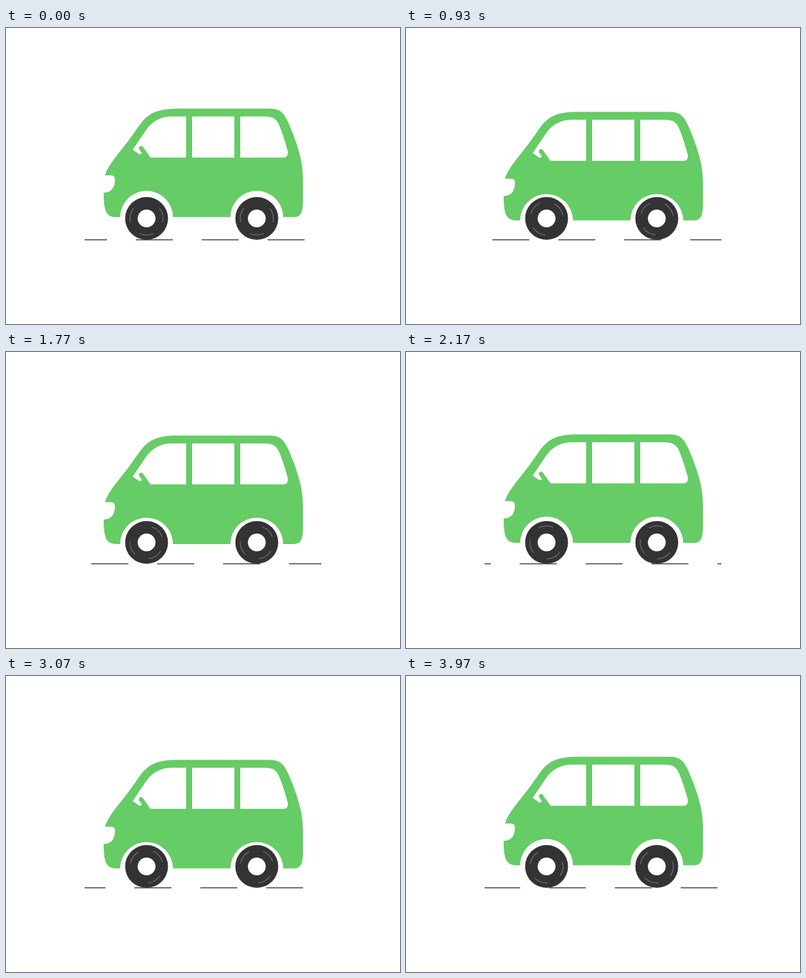
An HTML page that plays this animation: 597x450 px, repeating every 4.01 s.

```html
<!DOCTYPE html>
<html lang="en">
<head>
<meta charset="utf-8">
<title>Green van</title>
<style>
  html, body { margin: 0; width: 100%; height: 100%; overflow: hidden; background: #fff; }
  svg { display: block; }
  .tyre { fill: #333; }
  .hub, .glass { fill: #fff; }
  .shine { fill: none; stroke: #666; stroke-width: 1.5; }
</style>
</head>
<body>
<svg width="597" height="450" viewBox="0 0 597 450">
  <defs>
    <path id="arc" class="shine" d="M-10.8 22.6 A25 25 0 0 0 10.8 22.6"/>
    <g id="shines">
      <use href="#arc"/>
      <use href="#arc" transform="rotate(102)"/>
      <use href="#arc" transform="rotate(-102)"/>
    </g>
  </defs>

  <path id="road" d="M119 322H478" stroke="#444" stroke-width="1.5" stroke-dasharray="56 43.8"/>

  <g id="body">
    <path fill="#6c6" d="M150 224 C153 214 160 204 167 195 L185 172 L200 151
      C212 134 222 122.6 260 122.6 H398 C415 122.6 420 128 427 142
      C435 160 442 179 446 196 Q450 213 450 232 V262
      C450 280 447 287.6 436 287.6 H420 A40 40 0 0 0 340 287.6
      H253 A40 40 0 0 0 173 287.6 H168 C152 287.6 148 279 148 250.5
      C158 250 165 245 165 230 Q165 224 159 224 Z"/>
    <path class="glass" d="M273 134.6 H252 C234 134.6 222 142 213 154
      L192 185 L202.5 192.6 L206 190.5 L201.6 184
      C200 181 204 177.5 207 180 L219 197 H273 Z"/>
    <path class="glass" d="M282 134.6 H346 V197 H282 Z"/>
    <path class="glass" d="M355 134.6 H391 C405 134.6 410 139 414 148
      C419 160 424 176 427 188 Q428 197 420 197 H355 Z"/>
  </g>

  <g transform="translate(213 289.5)">
    <circle class="tyre" r="32.5"/>
    <use class="spin" href="#shines"/>
    <circle class="hub" r="13.5"/>
  </g>
  <g transform="translate(380 289.5)">
    <circle class="tyre" r="32.5"/>
    <use class="spin" href="#shines"/>
    <circle class="hub" r="13.5"/>
  </g>
</svg>
<script>
  const LOOP = 4010, STEP = 100 / 3, LAST = 119;
  const ROAD_SPEED = 11.908;   // px per step
  const TURN = 21;             // degrees per step
  const BOUNCE = 5.4, BOUNCE_STEPS = 20;

  const road = document.getElementById('road');
  const body = document.getElementById('body');
  const spins = document.querySelectorAll('.spin');
  const start = performance.now();

  function draw(ms) {
    // Steps begin on times rounded to 10 ms.
    const n = Math.min(LAST, Math.floor((ms % LOOP + 5) / STEP));
    const drop = BOUNCE * (1 - Math.cos(2 * Math.PI * n / BOUNCE_STEPS)) / 2;
    road.setAttribute('stroke-dashoffset', 22 - ROAD_SPEED * n);
    body.setAttribute('transform', `translate(0 ${drop})`);
    spins.forEach(s => s.setAttribute('transform', `rotate(${-TURN * n})`));
  }

  function tick() {
    draw(performance.now() - start);
    requestAnimationFrame(tick);
  }
  tick();
</script>
</body>
</html>
```
